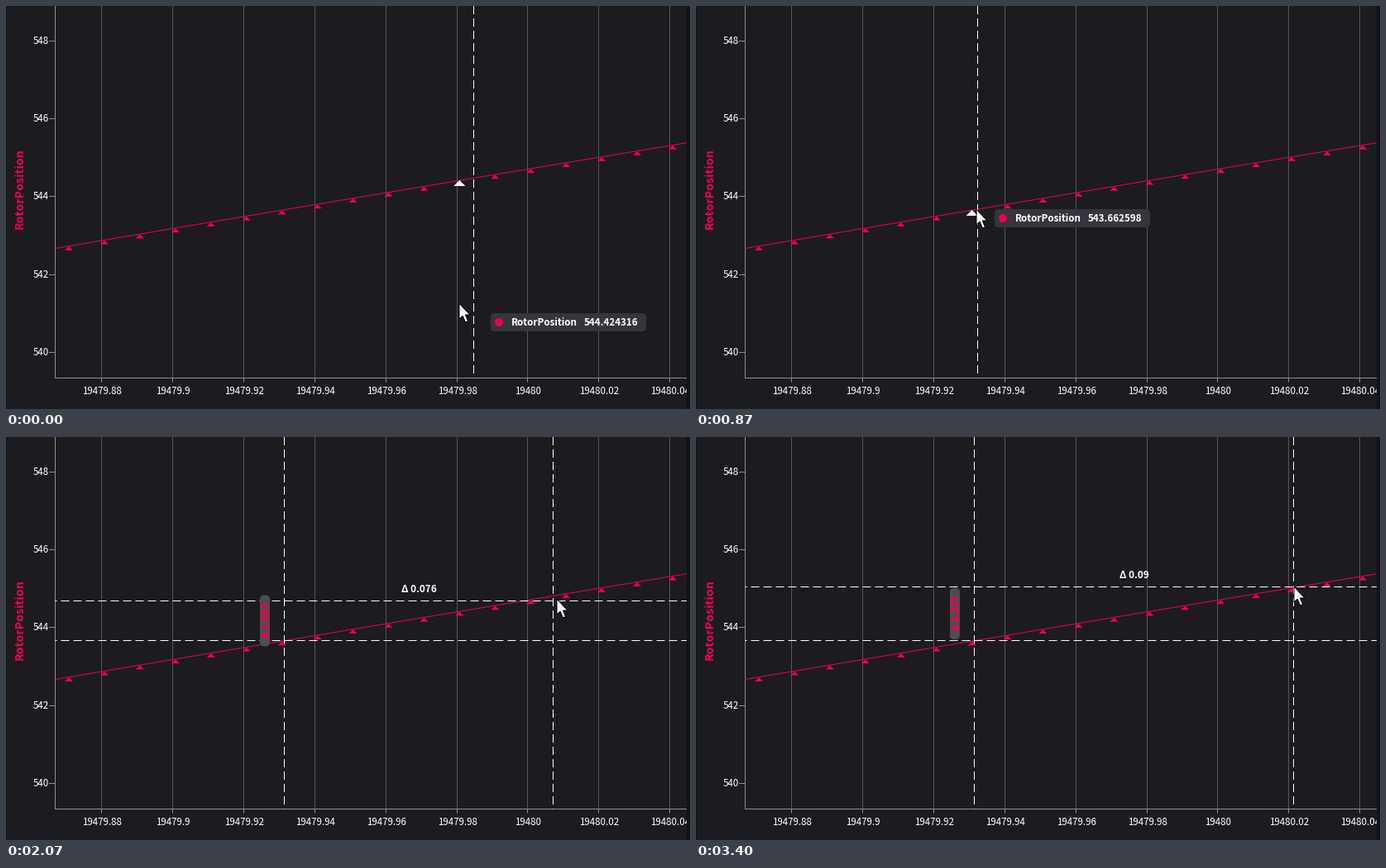
Recreate the animation shown at these times as a matplotlib script. Size 827 by 488 pixels, loop 4340 ms.

```python
import numpy as np
import matplotlib.pyplot as plt
from matplotlib.animation import FuncAnimation
from matplotlib.patches import Circle, FancyBboxPatch, Polygon, Rectangle
from matplotlib.patheffects import withStroke

W, H, DPI = 827, 488, 64
PT = 72 / DPI                      # points per pixel
LOOP, TICK = 4340, 20
STEP = 200 / 3                     # the chart refreshes at this pace, in ms
LEAD = 40                          # the mouse arrow runs ahead of the chart

BACK, EDGE = "#1c1b1f", "#131216"
GRID, AXIS = "#56555a", "#8f8e93"
RED, WHITE = "#f0004e", "#ffffff"
TIP, PILL = "#36353d", "#4d4c50"

LEFT, RIGHT, BOTTOM = 59.5, 823, 450.5
UNIT = 47.2                        # pixels per unit of the value axis
SPACING = 42.94                    # pixels between samples
MARKS = 76 + SPACING * np.arange(18)
ANCHOR = (336, 246)
MEASURE_AT = 1200

# Pointer stops: time, x, y
STOPS = np.array([
    (0, 565, 372), (400, 395, 260), (870, 340, 246), (1000, 336, 246),
    (1180, 336, 246), (1470, 540, 233), (1510, 590, 232), (1800, 635, 214),
    (2330, 690, 184), (2400, 710, 181), (3400, 722, 181),
], dtype=float)
BURSTS = [(0, 1000), (1200, 2530), (2670, 2870), (3330, 3400)]

plt.rcParams["font.family"] = "Noto Sans CJK JP"
fig = plt.figure(figsize=(W / DPI, H / DPI), dpi=DPI, facecolor=BACK)
ax = fig.add_axes([0, 0, 1, 1])
ax.set_xlim(0, W)
ax.set_ylim(H, 0)
ax.axis("off")


def stroke(xs, ys, color, z=1, **kw):
    return ax.plot(xs, ys, color=color, lw=PT, zorder=z, snap=False,
                   solid_capstyle="butt", dash_capstyle="butt", **kw)[0]


def dashed(xs, ys, offset=0):
    return stroke(xs, ys, WHITE, 5, linestyle=(offset, (10, 5)))


def label(x, y, text, size=11.5, color=WHITE, z=3, **kw):
    return ax.text(x, y, text, fontsize=size * PT, color=color, zorder=z,
                   va="baseline", **kw)


def upright(x, y, text, size, z=3):
    return label(x, y, text, size, RED, z, ha="center", rotation=90,
                 rotation_mode="anchor", weight="bold")


def triangle(x, y, half, height):
    return [(x, y), (x + half, y + height), (x - half, y + height)]


def rounded(w, h, color, z):
    box = FancyBboxPatch((0, 0), w, h, fc=color, ec="none", zorder=z,
                         boxstyle="round,pad=0,rounding_size=5")
    return ax.add_patch(box)


def signal(x):
    """Recorded value under pixel column x."""
    n = (x - MARKS[7]) / SPACING
    return 543.81543 + 0.1527099 * n - 0.0001221 * n * n


def curve(x):
    return 231.3 - (signal(x) - 544) * UNIT


def trim(value, digits):
    return f"{value:.{digits}f}".rstrip("0").rstrip(".")


def tangents():
    """Slopes at the stops that keep the path smooth without overshoot."""
    slope = np.diff(STOPS[:, 1:], axis=0) / np.diff(STOPS[:, :1], axis=0)
    a, b = slope[:-1], slope[1:]
    same = a * b > 0
    inner = np.where(same, 2 * a * b / np.where(same, a + b, 1), 0)
    return np.vstack([slope[:1], inner, 0 * slope[-1:]])


SLOPES = tangents()


def pointer(t):
    t = min(t, STOPS[-1, 0])
    i = min(np.searchsorted(STOPS[:, 0], t, side="right"), len(STOPS) - 1) - 1
    span = STOPS[i + 1, 0] - STOPS[i, 0]
    u = (t - STOPS[i, 0]) / span
    start, end = STOPS[i, 1:], STOPS[i + 1, 1:]
    return (start + (end - start) * u * u * (3 - 2 * u)
            + span * u * (1 - u) * ((1 - u) * SLOPES[i] - u * SLOPES[i + 1]))


def last_refresh(now):
    """Latest refresh that fell within a burst of movement."""
    times = np.round(np.arange(LOOP / STEP) * STEP, -1)
    return max(t for t in times
               if t <= now and any(a <= t <= b for a, b in BURSTS))


# Chart
for i in range(9):
    x = int(115.6 + 2 * SPACING * i) + 0.5
    stroke([x, x], [0, BOTTOM], GRID)
    stroke([x, x], [BOTTOM, BOTTOM + 5], AXIS)
    label(x + 0.5, 470, trim(19479.88 + 0.02 * i, 2), ha="center")
for i in range(5):
    y = int(42 + 2 * UNIT * i) + 0.5
    stroke([52, LEFT], [y, y], AXIS)
    label(51.5, y + 3.7, str(548 - 2 * i), ha="right")
stroke([LEFT, LEFT, RIGHT], [0, BOTTOM, BOTTOM], AXIS, 2)
upright(20.5, 221, "RotorPosition", 14.3)
trace = np.linspace(LEFT, RIGHT, 40)
stroke(trace, curve(trace), RED, 3)
for x in MARKS:
    ax.add_patch(Polygon(triangle(x, curve(x) + 0.2, 5, 5), fc=RED, zorder=4))
for x, w in ((0, 1), (RIGHT, W - RIGHT)):
    ax.add_patch(Rectangle((x, 0), w, H, fc=EDGE, zorder=6))

# Hover readout
hot = ax.add_patch(Polygon(triangle(0, 0, 7, 7), fc=WHITE, zorder=5))
tip = rounded(188, 22, TIP, 7)
dot = ax.add_patch(Circle((0, 0), 5, fc=RED, zorder=8))
name = label(0, 0, "RotorPosition", 11.7, z=8, weight="bold")
reading = label(0, 0, "", z=8, weight="bold")
hover = [hot, tip, dot, name, reading]

# Measuring lines; the moving vertical one serves both modes
moving_v = dashed([0, 0], [0, BOTTOM])
fixed_v = dashed([ANCHOR[0] + 0.5] * 2, [0, BOTTOM])
moving_h = dashed([LEFT, RIGHT], [0, 0], 8)
fixed_h = dashed([LEFT, RIGHT], [ANCHOR[1] + 0.5] * 2, 8)
pill = rounded(12, 62, PILL, 7)
delta_x = label(0, 0, "", 11.8, z=8, ha="center", weight="bold")
delta_y = upright(317, 0, "", 11.8, 8)
delta_y.set_path_effects([withStroke(linewidth=0.6 * PT, foreground=RED)])
measure = [fixed_v, moving_h, fixed_h, pill, delta_x, delta_y]

ARROW = np.array([(0, 0), (0, 19), (4.2, 15.2), (7.4, 23), (10.6, 21.6),
                  (7.4, 14), (13, 14)])
arrow = ax.add_patch(Polygon(ARROW, fc=WHITE, ec="black", lw=PT, zorder=10))


def show_hover(x, y):
    mark = MARKS[np.argmin(abs(MARKS - x))]
    hot.set_xy(triangle(mark, curve(mark) - 0.3, 7, 7))
    value = trim(signal(mark), 6)
    left, mid = x + 21, y + 11
    tip.set_bounds(left, mid - 11, 188 - 7 * (10 - len(value)), 22)
    dot.center = (left + 10, mid)
    name.set_position((left + 25, mid + 3.7))
    reading.set_position((left + 113, mid + 3.7))
    reading.set_text(value)


def show_measure(x, y):
    moving_h.set_ydata([y + 0.5] * 2)
    mid = (y + ANCHOR[1]) / 2 + 0.5
    pill.set_bounds(307, mid - 31, 12, 62)
    delta_x.set_position(((x + ANCHOR[0]) / 2 + 0.5, y - 10))
    delta_x.set_text("Δ " + trim((x - ANCHOR[0]) * 0.01 / SPACING, 3))
    delta_y.set_position((317, mid))
    delta_y.set_text("Δ " + trim((ANCHOR[1] - y) / UNIT, 3))


def update(frame):
    t = last_refresh(frame * TICK + TICK / 2)
    x, y = (round(v) for v in pointer(t))
    measuring = t >= MEASURE_AT
    for artist in hover:
        artist.set_visible(not measuring)
    for artist in measure:
        artist.set_visible(measuring)
    moving_v.set_xdata([x + 0.5] * 2)
    (show_measure if measuring else show_hover)(x, y)
    arrow.set_xy(ARROW + np.round(pointer(t + LEAD)) + (1, 0))
    return []


anim = FuncAnimation(fig, update, frames=LOOP // TICK, interval=TICK,
                     init_func=lambda: [], repeat=True, repeat_delay=0,
                     blit=False)
plt.show()
```
